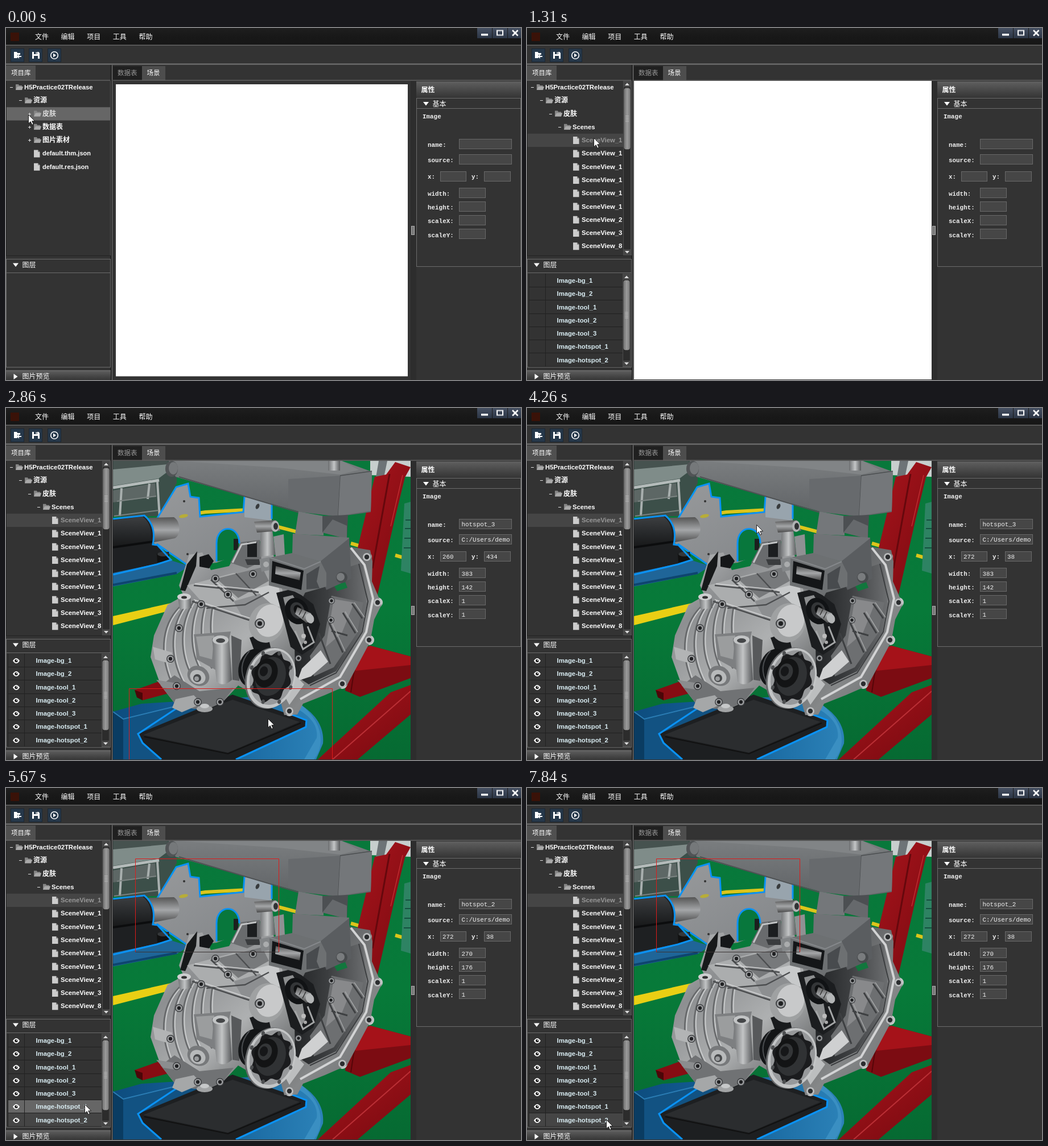
An HTML page for the animation above (8000 ms loop, 905 px wide and 619 px high).

```html
<!DOCTYPE html>
<html lang="zh">
<head>
<meta charset="utf-8">
<title>Scene editor</title>
<style>
html, body { margin: 0; width: 100%; height: 100%; overflow: hidden; background: #333; }
svg { display: block; width: 905px; height: 619px; }
text { font-family: "Liberation Sans", "Noto Sans CJK SC", "Noto Sans CJK", sans-serif; white-space: pre; }
.b { font-weight: bold; }
.m { font-family: "Liberation Mono", monospace; font-weight: bold; font-size: 10.9px; }
.v { font-weight: normal; }
</style>
</head>
<body>
<svg id="stage" viewBox="0 0 905 619" xmlns="http://www.w3.org/2000/svg"></svg>
<script>
const rect = (x, y, w, h, fill, more = '') =>
  `<rect x="${x}" y="${y}" width="${w}" height="${h}" fill="${fill}" ${more}/>`;
const path = (d, fill, more = '') => `<path d="${d}" fill="${fill}" ${more}/>`;
const line = (d, color, w = 1) => path(d, 'none', `stroke="${color}" stroke-width="${w}"`);
const text = (x, y, s, size = 12, fill = '#fff', more = '') =>
  `<text x="${x}" y="${y}" font-size="${size}" fill="${fill}" ${more}>${s}</text>`;
const mono = (x, y, s, more = '', kind = 'm') => `<text class="${kind}" x="${x}" y="${y}" fill="#f0f0f0" ${more}>${s}</text>`;
const circle = (x, y, r, fill, more = '') => `<circle cx="${x}" cy="${y}" r="${r}" fill="${fill}" ${more}/>`;
const oval = (x, y, rx, ry, fill, turn = 0, more = '') =>
  `<ellipse cx="${x}" cy="${y}" rx="${rx}" ry="${ry}" fill="${fill}" transform="rotate(${turn} ${x} ${y})" ${more}/>`;
const box = (x, y, w, h, fill, color) => rect(x + .5, y + .5, w - 1, h - 1, fill, `stroke="${color}"`);
const grad = (id, dir, ...stops) => `<linearGradient id="${id}" x2="${dir === 'h' ? 1 : dir === 'd' ? .8 : 0}" y2="${dir === 'h' ? 0 : 1}">` +
  stops.map((c, i) => `<stop offset="${i / (stops.length - 1)}" stop-color="${c}"/>`).join('') + '</linearGradient>';

const PITCH = 23.28, HOVER = '#666', SELECTED = '#454545', GLOW = '#0a92f5';

const defs = '<defs>' +
  grad('title', 'v', '#1e1e1e', '#181818', '#161616') + grad('head', 'v', '#606060', '#4a4a4a', '#363636') +
  grad('thumb', 'h', '#707070', '#9c9c9c', '#7a7a7a') + grad('win', 'v', '#465062', '#2c3646') +
  grad('floor', 'v', '#08783b', '#077a39', '#066a32') + grad('silver', 'd', '#c4c6c7', '#8d8f91', '#aeb0b1', '#5c5e60') +
  grad('bell', 'd', '#a9abac', '#626466', '#858788', '#707274') + grad('cave', 'h', '#1f2123', '#3c3e40', '#6c6e70') +
  grad('tube', 'v', '#555', '#a4a6a8', '#4a4a4a') + grad('motor', 'v', '#3d3f41', '#292b2d', '#18191a') +
  grad('post', 'h', '#6c6e70', '#c2c4c5', '#57595b') + grad('beam', 'v', '#7a7d7f', '#606366') +
  grad('red', 'd', '#a8141c', '#7d0b11') + grad('plate', 'd', '#97999b', '#84878a') + grad('deck', 'h', '#0d4c7e', '#15639b', '#2c82b8') +
  '<clipPath id="view"><rect x="188" y="93" width="523" height="525"/></clipPath>' +
  '<clipPath id="treeClip"><rect x="1" y="93" width="167" height="306"/></clipPath>' +
  '<clipPath id="field"><rect x="797" y="222" width="91" height="18"/></clipPath></defs>';

function room() {
  return rect(188, 93, 523, 525, 'url(#floor)') +
    path('M188 93H300V132L268 190L188 191Z', '#3c4f49') + path('M188 145L262 132L264 156L188 166Z', '#5d6765') +
    path('M188 93H284V112L268 124L188 137Z', '#7f8c89') + path('M188 93H284V99L188 108Z', '#46524f') +
    line('M188 140L269 127', '#b4bbba', 5) + line('M266 130L270 192M203 141L200 190M252 133L249 160', '#a8afae', 4) +
    line('M195 164L264 155M190 190L268 180', '#7b8381', 2) +
    path('M188 366L290 343L297 354L188 382Z', '#e9cf14') +
    line('M240 201L350 183L425 179M478 209L516 219M606 238L620 242M684 259L698 263', '#dcc51a', 6) +
    path('M640 93H711V121L640 118Z', '#c7cecd') + path('M655 93H670L664 122H650Z', '#6d7477') +
    path('M648 121L668 117L684 95L711 104L701 122L682 200L652 332L640 300L617 250Z', 'url(#red)') +
    line('M674 116L644 282', '#66080d', 3) + line('M697 118L676 208', '#c02a30', 1.5) +
    path('M700 168L711 165V291L694 286Z', '#2e8363') +
    line('M702 197H711M701 212H711M700 229H711M699 246H711', '#14503f', 2) +
    path('M601 434L640 418L711 437V475L622 508L596 497Z', '#7c0c12') +
    path('M601 434L640 418L711 437V452L615 462Z', '#a51219') + line('M612 460L606 500', '#560609', 2) +
    path('M711 487L676 500L548 618H618L711 539Z', 'url(#red)') + line('M711 498L574 618', '#bb3036', 2) +
    path('M226 496L277 478L300 498L240 514Z', '#870d13') + path('M226 496L240 501V514L230 509Z', '#4c0609') +
    path('M188 534L238 520L480 505C540 525 560 557 557 590L545 618H188Z', 'url(#deck)') +
    path('M496 522C536 538 549 560 546 580L524 618H541C560 595 560 553 515 519Z', '#3a8fc2') +
    path('M188 534L206 548V618H188Z', '#0a3c62') +
    path('M206 548L240 536L420 512L232 572L262 618H206Z', '#125282') + line('M188 534L206 547L300 524', '#2a7db5', 2) +
    path('M232 573L398 504L528 549L527 561L405 618H271L240 589Z', '#1d1f21') +
    path('M241 575L398 513L516 552L390 606Z', '#2b2d2f') + line('M243 578L390 608L518 554', '#111', 2) +
    line('M300 528L232 573L240 589L273 618M404 618L527 561L528 549L494 536', GLOW, 3.2);
}

function fixture() {
  return path('M188 286L290 268L322 278L300 292L188 314Z', '#1f6598') + line('M188 311L300 290', '#0e456f', 4) +
    path('M265 195L299 139L320 133L324 156L339 158L341 191L417 183L419 156L467 166V215L430 250L370 272L320 278L260 238Z', 'url(#plate)') +
    path('M419 157L467 166V198L419 192Z', '#98a4ad') +
    path('M370 270V238C370 204 410 204 410 238V262Z', '#08773c') + rect(400, 230, 8, 20, '#1c1f1e') +
    line('M265 195L299 139L320 133L324 156L339 158L341 191L417 183L419 156M467 165V195M265 239L320 277L342 266M370 270V238C370 204 410 204 410 238', GLOW, 3) +
    oval(312, 190, 8, 3, '#b7ad38', -12) + circle(313, 164, 2, '#333') + oval(442, 173, 3, 5, '#383b3d', 25) + circle(319, 257, 2, '#333') +
    path('M250 193L295 192C308 200 307 224 297 229L255 237Z', 'url(#tube)') +
    path('M188 195L243 189C259 202 262 220 258 240L266 241L288 264L265 274L188 290Z', '#1e2022') +
    path('M188 197L240 191C252 199 258 218 253 233L188 243Z', 'url(#motor)') + line('M188 245L258 235', '#0c0d0e', 4) +
    path('M265 256L286 253L288 269L266 272Z', '#111') + oval(276, 257, 10, 4, '#35383a') +
    line('M188 195L243 189C259 202 262 220 258 240L266 241L290 267L265 275L188 293', GLOW, 3);
}

// Repeated bolt: dark rim, metal head, hole.
const bolt = (x, y, r = 7) => circle(x, y, r, '#3c3e40') + circle(x, y, r * .8, '#9c9ea0') + circle(x, y, r * .45, '#1f2022');
const ear = (x, y) => circle(x, y, 9, '#c9cbcc') + circle(x, y, 4.5, '#333537');

// Tilted ring outline with shallow scallops.
function scallop(cx, cy, rx, ry, turn) {
  let d = '';
  for (let i = 0; i < 72; i++) {
    const a = i * Math.PI / 36, k = 1 + .09 * Math.cos(8 * a);
    d += `${i ? 'L' : 'M'}${(cx + rx * k * Math.cos(a)).toFixed(1)} ${(cy + ry * k * Math.sin(a)).toFixed(1)}`;
  }
  return path(d + 'Z', '#1b1c1e', `transform="rotate(${turn} ${cx} ${cy})"`);
}

function housing() {
  let s = '';
  for (const [x, y] of [[634, 262], [653, 342], [638, 408], [498, 533], [591, 485]]) s += ear(x, y);
  s += path('M480 318L605 244L640 250L644 270L643 305L655 333L660 346L647 372L640 411L599 488L560 505L522 520L512 539L489 540L478 500L500 440Z', 'url(#bell)') +
    path('M538 300L626 272L634 345L624 398L580 463L532 486L508 470L498 380Z', 'url(#cave)') +
    path('M572 330L628 342L617 396L576 456L541 472L534 436L560 400Z', '#6d6f71') +
    path('M576 336L612 342L590 396L562 420Z', '#88898b') + path('M576 312L596 306L600 316L582 322Z', '#12763d') +
    path('M520 458L553 426L566 446L536 472L512 480Z', '#cfd0d1') + path('M508 470L524 486L498 522L486 500Z', '#bcbebf') +
    line('M606 246L630 276L645 335L633 394L587 473L517 512', '#d2d3d4', 4) + line('M620 274L636 340L626 394L580 466L534 488', '#3c3e40', 2) +
    line('M608 344L626 370M592 360L614 396M568 378L592 430M550 396L570 450M600 400L572 392', '#3e4042', 3) +
    line('M612 342L630 368M596 358L618 394M572 376L596 428', '#a2a4a5', 1.5);
  for (const [x, y] of [[634, 262], [653, 342], [638, 408], [498, 533], [591, 485]]) s += circle(x, y, 7, '#babcbd') + circle(x, y, 4.2, '#2b2d2f');
  return s;
}

function gearbox() {
  let s = housing() +
    path('M312 330L304 312L322 258L345 254L360 285L392 278L412 243L440 238L470 258L486 322L507 410L508 470L455 515L408 488L380 518L350 531L301 525L272 488L254 438L260 400L284 346Z', 'url(#silver)') +
    path('M306 320L318 275L336 252L334 278L315 322Z', '#17191a');
  for (let i = 0; i < 6; i++) {
    const arc = k => `M${305 + k + i * 13} ${350 - i * 6}C${270 + k + i * 17} ${385 - i * 3} ${270 + k + i * 17} ${440 - i * 4} ${294 + k + i * 17} ${490 - i * 8}`;
    s += line(arc(0), '#66686a', 2.5) + line(arc(3), '#c6c8c9', 2);
  }
  s += path('M272 488L301 525L350 531L380 518L400 492L340 498L296 470Z', '#707274') +
    path('M318 312L400 290L462 302L472 326L420 346L354 352Z', '#abadae') + path('M370 300L450 280L462 304L408 334Z', '#77797b') +
    path('M400 340L462 322L470 340L440 372L418 372Z', '#8d8f91') + path('M436 318L478 308L486 350L470 348Z', '#c7c9ca') +
    line('M330 312L444 324M360 302L400 340M404 291L440 330M327 340L430 374M352 352L420 346L462 324', '#4c4e50', 2.5) +
    line('M332 309L444 320M363 300L404 337M330 337L430 370', '#d0d1d2', 1.5) +
    path('M330 398L395 393L388 425L371 462L335 442Z', '#7d7f81') + path('M334 402L366 400L362 442L340 436Z', '#9b9d9e') +
    path('M362 405L392 401L397 478Q382 492 370 481Z', 'url(#post)') +
    oval(377, 408, 14, 8, '#c2c4c5') + oval(377, 409, 8, 4, '#444648') + path('M396 400L414 408L410 480L398 478Z', '#57595b') +
    oval(338, 471, 20, 17, '#77797b', 30) + oval(337, 473, 14, 12, '#b8babb', 30) + circle(336, 475, 7, '#47494b') + circle(335, 476, 4, '#9a9c9e') +
    path('M302 331L324 329L326 352L305 354Z', 'url(#post)') + oval(313, 332, 12, 6, '#cfd0d1') + oval(313, 333, 5, 2.5, '#333') +
    path('M394 272L413 236L446 232L449 270L424 282Z', '#696b6d') + path('M424 236H441V262H424Z', '#1c1e20') +
    line('M398 272L414 240L440 236', '#c2c4c5', 3) + path('M420 266H446V276H424Z', '#3a3c3e') +
    path('M448 210L468 215L474 258L445 262Z', 'url(#post)') + path('M436 200L474 197L482 216L441 219Z', 'url(#tube)') +
    oval(473, 208, 7, 10, '#b0b2b3') + oval(474, 208, 4, 6, '#303234') + path('M470 226L488 222L490 258L474 262Z', '#8f9193') +
    path('M428 404L459 394L467 430L440 437Z', '#191b1d') +
    oval(458, 378, 31, 35, '#9fa1a2', 18) + oval(463, 374, 24, 29, '#c8c9ca', 18) + bolt(446, 379, 9) +
    path('M475 325L500 319L519 329L540 345L552 380L540 421L520 434L500 420L490 380Z', '#1b1d1f') +
    path('M487 333L504 329L516 350L526 406L520 417L499 382Z', '#8d8f90') +
    oval(511, 357, 20, 24, '#111315', -25) + oval(512, 356, 12, 15, '#343638', -25) + oval(513, 355, 7, 9, '#0f1011', -25) +
    path('M512 350L536 361L540 373L528 378L508 362Z', 'url(#tube)') + oval(534, 370, 7, 9, '#b4b6b7', -25) + line('M520 354L515 364M527 358L521 370', '#333', 1.5) +
    line('M508 392L522 424L541 412L530 384', '#a3a5a6', 3) + circle(523, 401, 4, '#bbb') + circle(526, 412, 3, '#aaa') +
    oval(434, 457, 25, 34, '#131517', 16) + line('M428 427Q404 455 423 486', '#4a4d50', 2) +
    oval(464, 475, 43, 55, '#66686a', 18) + oval(466, 475, 42, 54, '#c3c5c6', 18) + oval(467, 474, 38, 49, '#97999b', 18) +
    scallop(466, 473, 33, 43, 18) + oval(465, 472, 26, 35, '#303234', 18) +
    oval(457, 466, 20, 26, '#131415', 18) + oval(455, 464, 12, 15, '#343638', 18) + oval(453, 463, 7, 9, '#161719', 18);
  for (let i = 0; i < 8; i++) {
    const a = (i + .5) * Math.PI / 4;
    s += oval(466 + 37 * Math.cos(a), 474 + 46 * Math.sin(a), 3, 4, '#4c4e50', 18);
  }
  s += path('M298 512L330 505L344 520L309 535L292 527Z', '#a5a7a8') + path('M258 420L292 430L290 450L262 442Z', '#b2b4b5') +
    path('M264 478L300 484L304 496L276 492Z', '#8b8d8f') +
    path('M340 262L356 257L365 269L357 282L340 279Z', '#151719') + oval(349, 529, 14, 6, '#a2a4a5') + oval(349, 524, 8, 4, '#c6c8c9');
  for (const [x, y] of [[304, 387], [289, 441], [300, 489], [337, 517], [376, 517], [390, 328], [343, 345], [368, 300], [434, 292]]) s += bolt(x, y);
  for (const [x, y] of [[572, 339], [571, 373], [514, 440]]) s += bolt(x, y, 6);
  return s;
}

function press() {
  return path('M286 93H590L643 112L641 183L583 191L518 183L298 121Z', 'url(#beam)') +
    path('M300 93H590L620 109L587 117L480 105Z', '#818486') + line('M304 121L516 184', '#4e5153', 2) +
    oval(291, 107, 11, 14, '#515456') + oval(294, 106, 8, 11, '#75787a') +
    rect(566, 93, 21, 17, 'url(#post)') + path('M587 119L643 111L641 181L583 190Z', '#74777a') +
    line('M587 119L583 190M587 119L643 111', '#4b4e50', 1.5) + path('M496 125L587 119L583 190L518 183L496 174Z', '#676a6d') +
    path('M514 182L558 190V224L508 222Z', '#74777a') + path('M556 190L601 188L599 230L556 219Z', '#4c4f52') +
    path('M556 219L574 196L599 207V230Z', '#66696c') + path('M504 221L603 228L600 260L552 270L503 256Z', '#707376') +
    path('M552 270L603 229L607 300L563 320L551 290Z', '#5a5d60') +
    path('M463 263L503 255L553 270L563 290V314L521 326L462 312Z', '#6d7072') +
    path('M468 269L523 286L519 320L466 306Z', '#141618') + path('M474 278L518 289L516 303L473 292Z', 'url(#tube)') +
    line('M463 263L524 283L553 270', '#85888b', 2) +
    path('M528 292L551 278L546 305L551 317L528 319Z', '#484b4e') + circle(590, 298, 10, '#484b4d') + circle(588, 297, 7, '#797c7e') +
    path('M445 266L463 262V285L449 288Z', '#838688') + circle(457, 275, 5, '#aaacad');
}

function scroller(x, top, bottom, thumbTop, thumbEnd) {
  const mid = (thumbTop + thumbEnd) / 2, h = bottom - top;
  let s = box(x, top, 14, h, '#2c2c2c', '#4c4c4c') + rect(x + 1, top + 1, 12, 10, '#454545') + rect(x + 1, bottom - 11, 12, 10, '#454545') +
    path(`M${x + 3} ${top + 8}h8l-4-4.5z`, '#ddd') + path(`M${x + 3} ${bottom - 8}h8l-4 4.5z`, '#ddd') +
    rect(x + 2, thumbTop, 10, thumbEnd - thumbTop, 'url(#thumb)', 'rx="3" stroke="#999" stroke-width=".7"');
  for (let i = -2; i < 3; i++) s += line(`M${x + 4} ${mid + i * 2.5}h6`, '#bbb', .8);
  return s;
}

// Row: [depth, label, kind]; kinds: - open, + closed, f file.
function tree(rows, name) {
  return rows.map(([depth, label, kind], i) => {
    const y = 104 + i * PITCH, x = 17 + depth * 16;
    const cjk = /[^\x00-\x7f]/.test(label);
    const icon = kind === 'f'
      ? path(`M${x} ${y - 6}h7l3.5 3.5v9.5h-10.5z`, '#ccc') + path(`M${x + 7} ${y - 6}v3.5h3.5z`, '#777')
      : path(`M${x} ${y + 5}v-10h5l1 2h5v2h2l-2 6z`, '#858585') + path(`M${x} ${y + 5}l3-6h10l-2 6z`, '#aaa');
    const mid = Math.round(y) + .5;
    const sign = kind === 'f' ? '' : line(`M${x - 10} ${mid}h5` + (kind === '+' ? 'm-2.5-2.5v5' : ''), '#ddd');
    return icon + sign + text(x + 15, Math.round(y + 4), label, cjk ? 12 : label.startsWith('def') ? 11 : 11.3, '#fff', `class="b" id="${name}${i}"`);
  }).join('');
}

const top2 = [[0, 'H5Practice02TRelease', '-'], [1, '资源', '-']];
const rest = [[2, '数据表', '+'], [2, '图片素材', '+'], [2, 'default.thm.json', 'f'], [2, 'default.res.json', 'f']];
const trees = [
  [...top2, [2, '皮肤', '+'], ...rest],
  [...top2, [2, '皮肤', '-'], [3, 'Scenes', '+'], ...rest],
  [...top2, [2, '皮肤', '-'], [3, 'Scenes', '-'], ...[1, 1, 1, 1, 1, 1, 2, 3, 8].map(n => [4, 'SceneView_' + n, 'f'])]
];
const layers = ['bg_1', 'bg_2', 'tool_1', 'tool_2', 'tool_3', 'hotspot_1', 'hotspot_2'];

function chrome() {
  let s = rect(0, 0, 905, 619, '#333') + rect(0, 0, 905, 30, 'url(#title)') + rect(0, 29.5, 905, 1.5, '#666') +
    rect(8, 8, 15, 15, '#3a1208') + rect(0, 62.5, 905, 2, '#777');
  ['文件', '编辑', '项目', '工具', '帮助'].forEach((m, i) => s += text(51 + i * 45.6, 19.5, m));
  [828, 855, 882].forEach((x, i) => s += rect(x, 0, i < 2 ? 26 : 23, 18, 'url(#win)'));
  s += rect(835, 10, 12, 3.5, '#fff') + box(862, 3.5, 12, 10, 'none', '#fff') + box(863, 4.5, 10, 8, 'none', '#fff') +
    line('M890 4L899.5 13.5M899.5 4L890 13.5', '#fff', 2.6);
  for (const x of [8, 40, 73]) s += box(x, 36, 24, 24, '#26384a', '#1b2733');
  s += path('M14 42h5l1 2h5v3h-5v6h-6z', '#fff') + path('M27 49h-4v-3l-4 4 4 4v-3h4z', '#fff') +
    path('M46 42h11l2 2v10h-13z', '#fff') + rect(49, 42, 6, 4, '#26384a') + rect(49, 49, 7, 5, '#26384a') + rect(52.5, 42.5, 1.7, 3, '#fff') +
    circle(85, 48, 6.3, 'none', 'stroke="#fff" stroke-width="1.6"') + path('M83 44.5v7l5-3.5z', '#fff');
  s += rect(0, 66, 52, 26, '#505050') + text(9, 83, '项目库', 11.5) + rect(0, 91.5, 184, 1, '#777') + line('M184.5 65V619', '#222', 2) + line('M186.5 65V619', '#777') +
    line('M.5 93V400.5H183.5V93', '#222') + line('M183.5 93V400', '#555');
  s += rect(188, 67, 51, 25, '#202020') + rect(239, 67, 41, 25, '#4d4d4d') + text(196, 83, '数据表', 11.5, '#999') + text(247.5, 83, '场景', 11.5) + rect(188, 91.5, 717, 1, '#777') +
    box(0, 406, 184, 25, '#333', '#6c6c6c') + path('M12 413.5h10l-5 6.5z', '#fff') + text(28.5, 421, '图层') +
    box(0, 430, 184, 167, '#333', '#6c6c6c') + rect(0, 602, 184, 17, 'url(#head)') + line('M0 602.5H184', '#777') +
    path('M13.5 608v10l7-5z', '#fff') + text(28.5, 617, '图片预览');
  s += rect(711, 93, 10, 526, '#2d2d2d') + box(712, 348, 6, 16, '#888', '#aaa') + line('M715 349V363', '#555') +
    rect(721, 94, 184, 28, 'url(#head)') + text(729.5, 113, '属性', 12, '#fff', 'class="b"') +
    box(721, 123, 184, 297, '#333', '#6c6c6c') + line('M721 141.5H904', '#6c6c6c') + path('M733 130h10l-5 6.5z', '#fff') + text(749.5, 137.5, '基本');
  s += mono(732, 159, 'Image');
  [['name', 209], ['source', 236], ['width', 295], ['height', 319], ['scaleX', 343], ['scaleY', 368]].forEach(([n, y], i) =>
    s += mono(741, y, n + ':') + box(796, y - 14 - (i === 5), i < 2 ? 93 : 47, 18, '#464646', '#696969'));
  return s + mono(741, 265, 'x:') + box(763, 252, 46, 18, '#464646', '#696969') + mono(818, 265, 'y:') + box(840, 252, 47, 18, '#464646', '#696969');
}

function layerList() {
  return layers.map((n, i) => text(52.5, Math.round(448 + i * PITCH), 'Image-' + n, 11.3, '#d9ecf2', 'class="b"') +
    line(`M3 ${Math.round(455 + i * PITCH) + .5}H168`, '#202020')).join('') +
    line('M32.5 432V595M3.5 432V595', '#222') + scroller(168, 432, 596, 444, 566);
}
const eyes = layers.map((n, i) => {
  const y = Math.round(444 + i * PITCH) + .5;
  return path(`M12 ${y}Q18 ${y - 9} 24 ${y}Q18 ${y + 9} 12 ${y}Z`, '#fff') + circle(18, y, 2.8, '#222') + circle(19, y - 1, 1, '#fff');
}).join('');

const group = (id, body, more = '') => `<g id="${id}" ${more}>${body}</g>`;
const stage = document.getElementById('stage');
const fields = { name: [800.5, 208], source: [800.5, 235], x: [767, 264.5], y: [844, 264.5], width: [800.5, 294.5], height: [800.5, 318.5], scaleX: [800.5, 342.5], scaleY: [800.5, 366.5] };

stage.innerHTML = defs + chrome() +
  group('treeRow', rect(1, 0, 182, 23.3, HOVER)) +
  trees.map((r, i) => group('tree' + i, tree(r, `n${i}_`), i === 2 ? 'clip-path="url(#treeClip)"' : '')).join('') +
  group('treeBar', scroller(169, 93, 400, 106, 213)) +
  group('list', layers.map((n, i) => rect(3, 432.2 + i * PITCH, 165, i === 6 ? 23 : 23.3, 'none', `id="row${i}"`)).join('') + layerList()) +
  group('eyes', eyes) +
  rect(193, 99, 513, 513.5, '#fff', 'id="paper"') +
  group('photo', room() + fixture() + gearbox() + press(), 'clip-path="url(#view)"') +
  group('frame', '<path id="sides" fill="none" stroke="#e01a1a"/><path id="base" fill="none" stroke="#3a3434"/>', 'clip-path="url(#view)"') +
  Object.entries(fields).map(([k, [x, y]]) => mono(x, y, '', `id="v_${k}"` + (k === 'source' ? ' clip-path="url(#field)"' : ''), 'm v')).join('') +
  group('cursor', path('M.5 .5V16L4.2 12.6 6.8 18.3 9.2 17.2 6.7 11.7H11.6Z', '#fff', 'stroke="#111" stroke-width=".9"'));

const el = {};
stage.querySelectorAll('[id]').forEach(e => el[e.id] = e);
const show = (id, on) => el[id].style.display = on ? '' : 'none';

const spot = (n, x, y, width, height) => ({ name: 'hotspot_' + n, source: 'C:/Users/demo', x, y, width, height, scaleX: 1, scaleY: 1 });
const left = spot(1, 152, 97, 196, 133), bracket = spot(2, 272, 38, 270, 176), tray = spot(3, 260, 434, 383, 142);
// [start, shown values, outlined spot, selected layer]
const picks = [
  [0, {}, null, -1], [2780, { x: 260, y: 434 }, null, -1], [2860, tray, tray, -1],
  [4260, { ...tray, x: 272, y: 38 }, null, -1], [4490, bracket, bracket, 6],
  [6450, left, left, 5], [7840, bracket, bracket, 6]
];

// [start, end, steps, eased, path points]
const moves = [
  [170, 690, 8, false, [[39, 152], [55, 171], [117, 193]]],
  [2090, 2400, 5, false, [[117, 193], [300, 350], [430, 460], [498, 525], [460, 546]]],
  [3870, 4260, 6, true, [[460, 546], [403, 205]]],
  [5040, 5670, 9, true, [[403, 205], [138, 556]]],
  [7000, 7310, 5, true, [[138, 556], [139, 583]]]
];
const progress = (t, a, b, n) => t < a ? 0 : Math.min(1, (1 + Math.floor((t - a) / (b - a) * (n - 1) + 1e-6)) / n);

function pointer(t) {
  const [a, b, n, eased, pts] = moves.filter((m, i) => !i || t >= m[0]).pop();
  let p = progress(t, a, b, n);
  if (eased) p = p * p * (3 - 2 * p);
  const u = p * (pts.length - 1), i = Math.min(pts.length - 2, Math.floor(u)), f = u - i;
  return [0, 1].map(k => Math.round(pts[i][k] + (pts[i + 1][k] - pts[i][k]) * f));
}

function outline(s) {
  show('frame', s);
  if (!s) return;
  const x = Math.round(s.x * .93 - 25.5) + .5, y = Math.round(s.y * .93 + 89) + .5;
  const w = Math.round(s.width * .932), h = Math.round(s.height * .932);
  el.sides.setAttribute('d', `M${x} ${y + h}V${y}H${x + w}V${y + h}`);
  el.base.setAttribute('d', `M${x} ${y + h}H${x + w}`);
}

function render(t) {
  const [cx, cy] = pointer(t);
  el.cursor.setAttribute('transform', `translate(${cx} ${cy})`);

  const open = t < 170 ? 0 : progress(t, 170, 690, 8) <= .5 ? 1 : 2;
  trees.forEach((r, i) => show('tree' + i, i === open));
  show('treeBar', open === 2);
  const row = t < 690 ? Math.floor((cy - 92.7) / PITCH) : 4, bar = el.treeRow.firstChild;
  bar.setAttribute('y', 92.7 + row * PITCH);
  bar.setAttribute('width', open === 2 ? 168 : 182);
  bar.setAttribute('fill', t < 1020 ? HOVER : SELECTED);
  el.n0_2.setAttribute('fill', '#ddd');
  el.n2_4.setAttribute('fill', t < 840 ? '#fff' : '#999');

  const ready = t >= 1310, loaded = t >= 1390;
  show('list', ready);
  show('eyes', loaded);
  show('photo', loaded);
  const paper = ready ? [188, 93, 523, 525] : [193, 99, 513, 513.5];
  ['x', 'y', 'width', 'height'].forEach((k, i) => el.paper.setAttribute(k, paper[i]));

  const [, values, picked, chosen] = picks.filter(p => t >= p[0]).pop();
  for (const k in fields) el['v_' + k].textContent = values[k] ?? '';
  outline(picked);

  const over = cx < 168 && cy > 432 && cy < 596 ? Math.floor((cy - 432) / PITCH) : -1;
  layers.forEach((n, i) => {
    const settled = i === chosen && t >= 6630;
    el['row' + i].setAttribute('fill', i === over && !settled ? HOVER : i === chosen ? SELECTED : 'none');
  });
}

const start = performance.now();
function tick() {
  render((performance.now() - start) % 8000);
  requestAnimationFrame(tick);
}
render(0);
requestAnimationFrame(tick);
</script>
</body>
</html>
```
